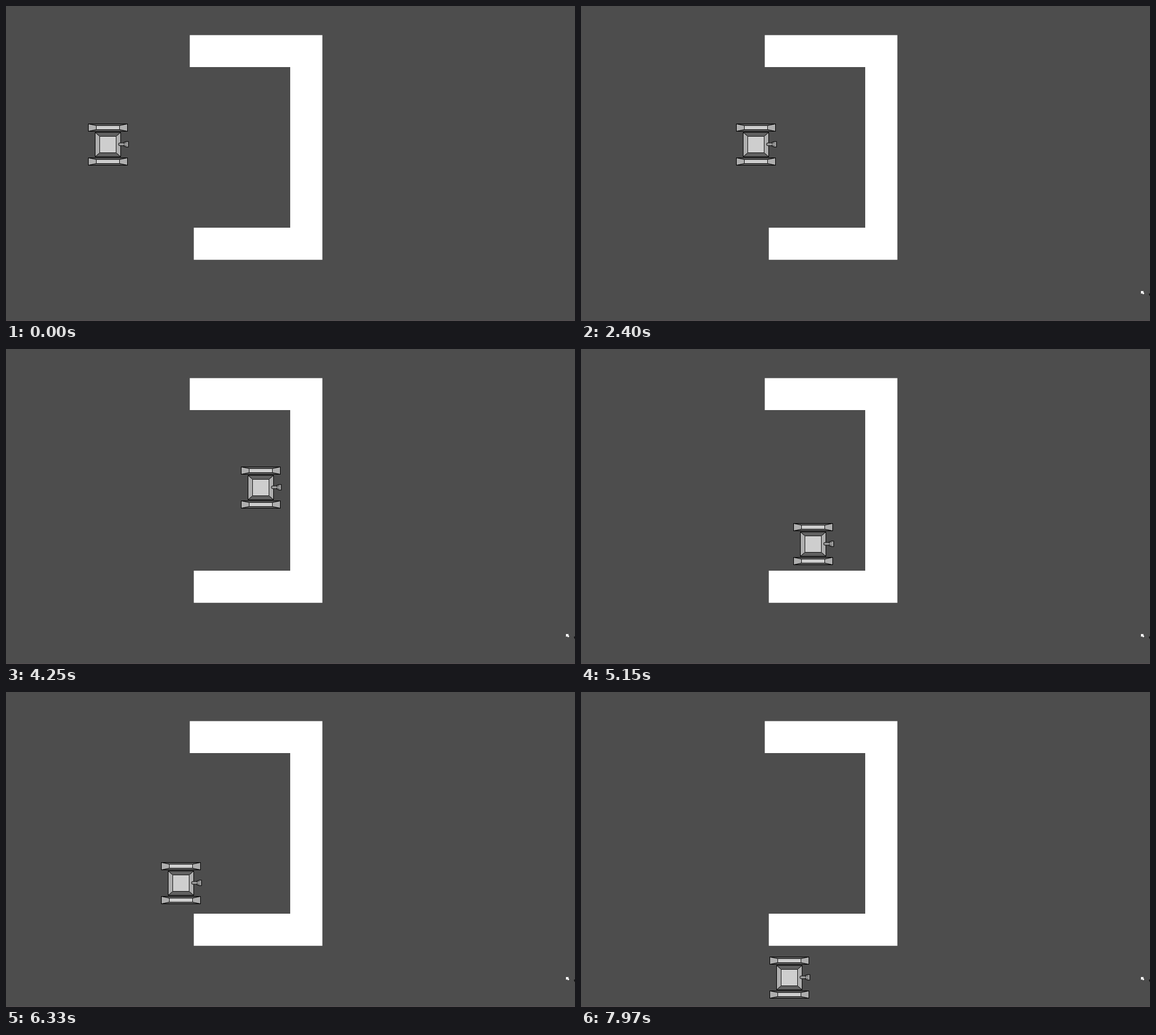
Write an HTML page with a canvas that moves like this. It is 1005 by 557 pixels and loops after 8000 ms.

```html
<!DOCTYPE html>
<html lang="en">
<head>
<meta charset="utf-8">
<title>Robot and wall</title>
<style>
html, body { margin: 0; width: 100%; height: 100%; overflow: hidden; background: #4d4d4d; }
canvas { display: block; width: 1005px; height: 557px; }
</style>
</head>
<body>
<canvas id="stage" width="1005" height="557"></canvas>
<script>
const ctx = document.getElementById('stage').getContext('2d');
const LOOP = 8000;
const TICK = 68.82;      // ms between picture updates
const PHASE = 395;
const SPEED = 0.257;     // robot speed, px per ms
const LINE = '#111';

const LEFT = [-1, 0], RIGHT = [1, 0], UP = [0, -1], DOWN = [0, 1];

// Steering: start time, direction, distance
const moves = [
  [1117, LEFT, 84], [1562, RIGHT, 366],
  [3245, LEFT, 83], [3605, RIGHT, 83],
  [4202, LEFT, 52], [4404, DOWN, 109],
  [5110, UP, 109], [5534, LEFT, 53], [5770, DOWN, 93],
  [6127, LEFT, 93], [6490, DOWN, 145], [7055, RIGHT, 28],
  [7580, DOWN, 22], [7667, RIGHT, 76]
];

const clamp = (v, lo, hi) => Math.min(hi, Math.max(lo, v));

function robotAt(t) {
  let x = 145, y = 207;
  for (const [start, [dx, dy], length] of moves) {
    const d = clamp((t - start) * SPEED, 0, length);
    x += dx * d;
    y += dy * d;
  }
  return [Math.round(x), Math.round(y)];
}

// The pointer swings in from the lower right corner.
function pointerAt(t) {
  const k = clamp((t - PHASE) / 490, 0, 1);
  const swing = Math.sin(Math.PI * k);
  return [Math.round(1001 - 12 * k - 18 * swing), Math.round(545 - 41 * k - 20 * swing)];
}

function poly(fill, stroke, ...p) {
  ctx.beginPath();
  for (let i = 0; i < p.length; i += 2) ctx.lineTo(p[i], p[i + 1]);
  ctx.closePath();
  ctx.fillStyle = fill;
  ctx.fill();
  if (stroke) {
    ctx.strokeStyle = stroke;
    ctx.stroke();
  }
}

// Bevelled block with side faces sx wide and upper and lower faces sy high
function bevel(l, t, w, h, sx, sy) {
  const r = l + w, b = t + h;
  const il = l + sx, ir = r - sx, it = t + sy, ib = b - sy;
  poly('#616161', LINE, l, t, r, t, ir, it, il, it);
  poly('#616161', LINE, l, b, r, b, ir, ib, il, ib);
  poly('#aeaeae', LINE, l, t, il, it, il, ib, l, b);
  poly('#aeaeae', LINE, r, t, ir, it, ir, ib, r, b);
  poly('#cecece', LINE, il, it, ir, it, ir, ib, il, ib);
  ctx.strokeStyle = '#000';
  ctx.strokeRect(l, t, w, h);
}

function box(fill, x, y, w, h) {
  ctx.fillStyle = fill;
  ctx.fillRect(x, y, w, h);
}

function arm() {
  ctx.beginPath();
  ctx.arc(56, 37.5, 2.5, Math.PI / 2, Math.PI * 1.5);
  ctx.lineTo(65, 35);
  ctx.lineTo(65, 40);
  ctx.closePath();
  ctx.fillStyle = '#8a8a8a';
  ctx.fill();
  ctx.strokeStyle = LINE;
  ctx.stroke();
  poly('#777', LINE, 63.5, 33.5, 66.5, 33.5, 66.5, 32.5, 71.5, 32.5,
    71.5, 42.5, 66.5, 42.5, 66.5, 41.5, 63.5, 41.5);
  box('#b8b8b8', 56, 37, 12, 1);
  box('#a0a0a0', 68, 34, 2, 7);
}

function robot(x, y) {
  ctx.save();
  ctx.translate(x, y);
  ctx.lineWidth = 1;
  for (const top of [1.5, 61.5]) bevel(0.5, top, 69, 13, 14, 3);
  bevel(12.5, 16.5, 45, 43, 8, 7);
  arm();
  ctx.restore();
}

function pointer(x, y) {
  ctx.save();
  ctx.translate(x, y);
  poly('#fff', null, 0, 0, 5, 0, 4, 1.5, 6, 4, 4, 6, 2, 4, 0, 5);
  poly('#111', null, 14, 5, 16, 4, 16, 9, 15, 8);
  ctx.restore();
}

function scene(t) {
  box('#4d4d4d', 0, 0, 1005, 557);
  box('#584f52', 0, 556, 1005, 1);
  poly('#fff', null, 324.6, 51.4, 558.8, 51.4, 558.8, 448.7, 331.7, 448.7,
    331.7, 392, 502, 392, 502, 108, 324.6, 108);
  robot(...robotAt(t));
  if (t >= PHASE) pointer(...pointerAt(t));
}

function frame() {
  const t = performance.now() % LOOP;
  scene(PHASE + Math.floor((t - PHASE) / TICK) * TICK);
  requestAnimationFrame(frame);
}
frame();
</script>
</body>
</html>
```
